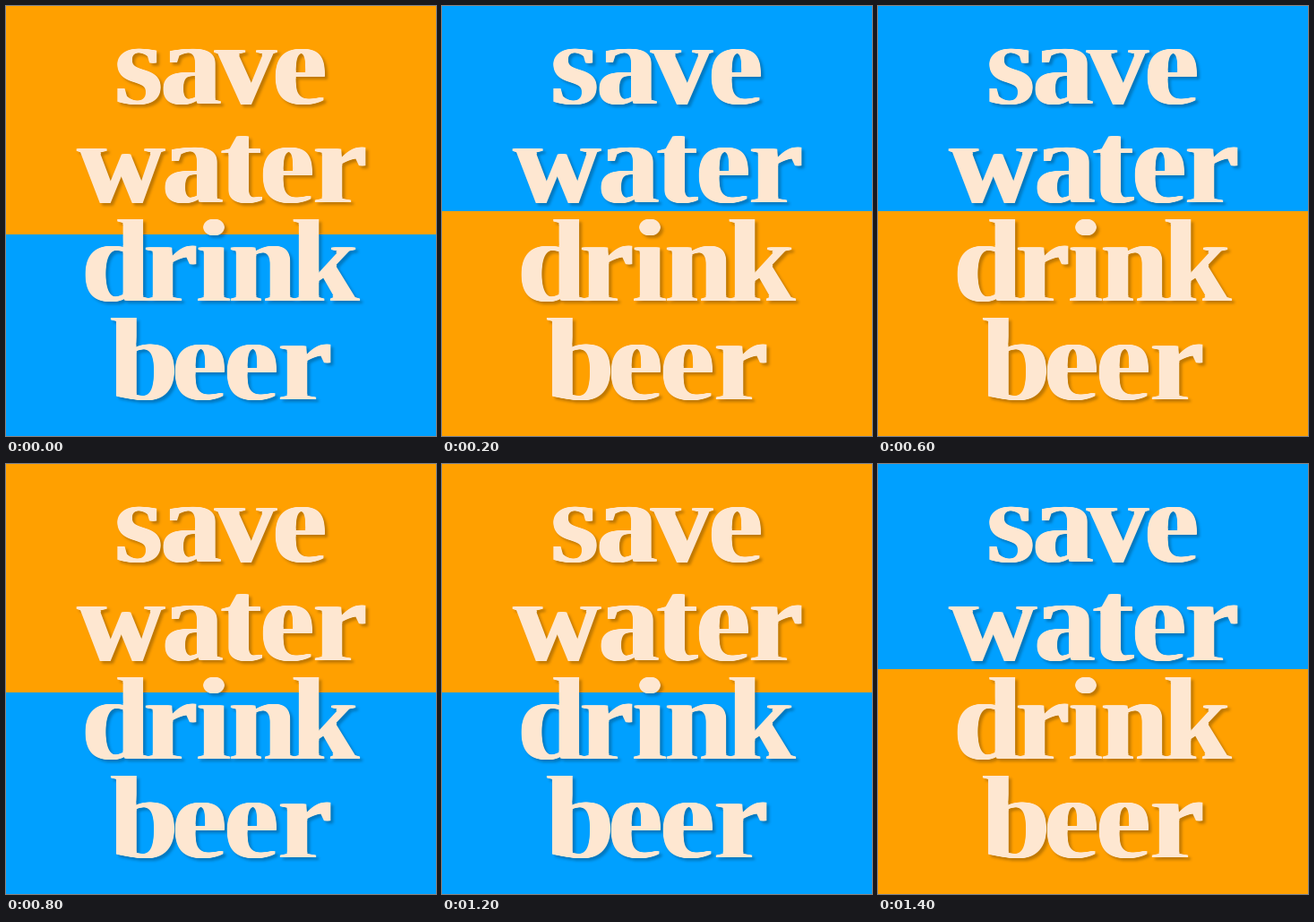
An HTML page that plays this animation: 480x480 px, repeating every 1.6 s.

```html
<!DOCTYPE html>
<html lang="en">
<head>
<meta charset="utf-8">
<title>save water drink beer</title>
<style>
  html, body { margin: 0; width: 100%; height: 100%; overflow: hidden; }
  #stage { position: relative; width: 480px; height: 480px; overflow: hidden; }
  #words {
    position: absolute;
    inset: 0;
    filter: url(#thin) drop-shadow(3px 3px 1.5px rgba(0, 0, 0, .25));
  }
  /* sideways copies fatten the stems */
  #words span {
    position: absolute;
    font: bold 134px/1 "Liberation Serif", "Times New Roman", serif;
    color: #fee7d1;
    text-shadow: -1px 0, 1px 0, -2px 0, 2px 0;
  }
</style>
</head>
<body>
<!-- trims 1px above and below, so that level strokes become hairlines -->
<svg width="0" height="0" style="position:absolute">
  <filter id="thin" x="0" y="0" width="1" height="1" color-interpolation-filters="sRGB">
    <feOffset in="SourceGraphic" dy="-1" result="up"/>
    <feOffset in="SourceGraphic" dy="1" result="down"/>
    <feComposite in="up" in2="down" operator="in"/>
  </filter>
</svg>
<div id="stage"><div id="words"></div></div>
<script>
const ORANGE = '#ffa000', BLUE = '#00a0ff';
const stage = document.getElementById('stage');
const words = document.getElementById('words');

// word, baseline, left edge of each letter
const lines = [
  ['save', 110, [122, 173, 234, 298]],
  ['water', 220, [80, 175, 240, 284, 343]],
  ['drink', 330, [85, 154, 213, 249, 319]],
  ['beer', 440, [117, 186, 244, 304]]
];

for (const [word, base, lefts] of lines) {
  const line = document.createElement('div');
  [...word].forEach((letter, i) => {
    const span = document.createElement('span');
    span.textContent = letter;
    span.style.left = lefts[i] + 'px';
    span.style.top = base - 112 + 'px';
    line.append(span);
  });
  words.append(line);
}

const split = (top, bottom, y) =>
  `linear-gradient(${top} ${y}px, ${bottom} ${y}px)`;

function draw(now) {
  const swapped = now % 400 >= 200;
  stage.style.background = swapped ? split(BLUE, ORANGE, 229) : split(ORANGE, BLUE, 255);
}

const start = performance.now();
function tick() {
  draw(performance.now() - start);
  requestAnimationFrame(tick);
}
tick();
</script>
</body>
</html>
```
